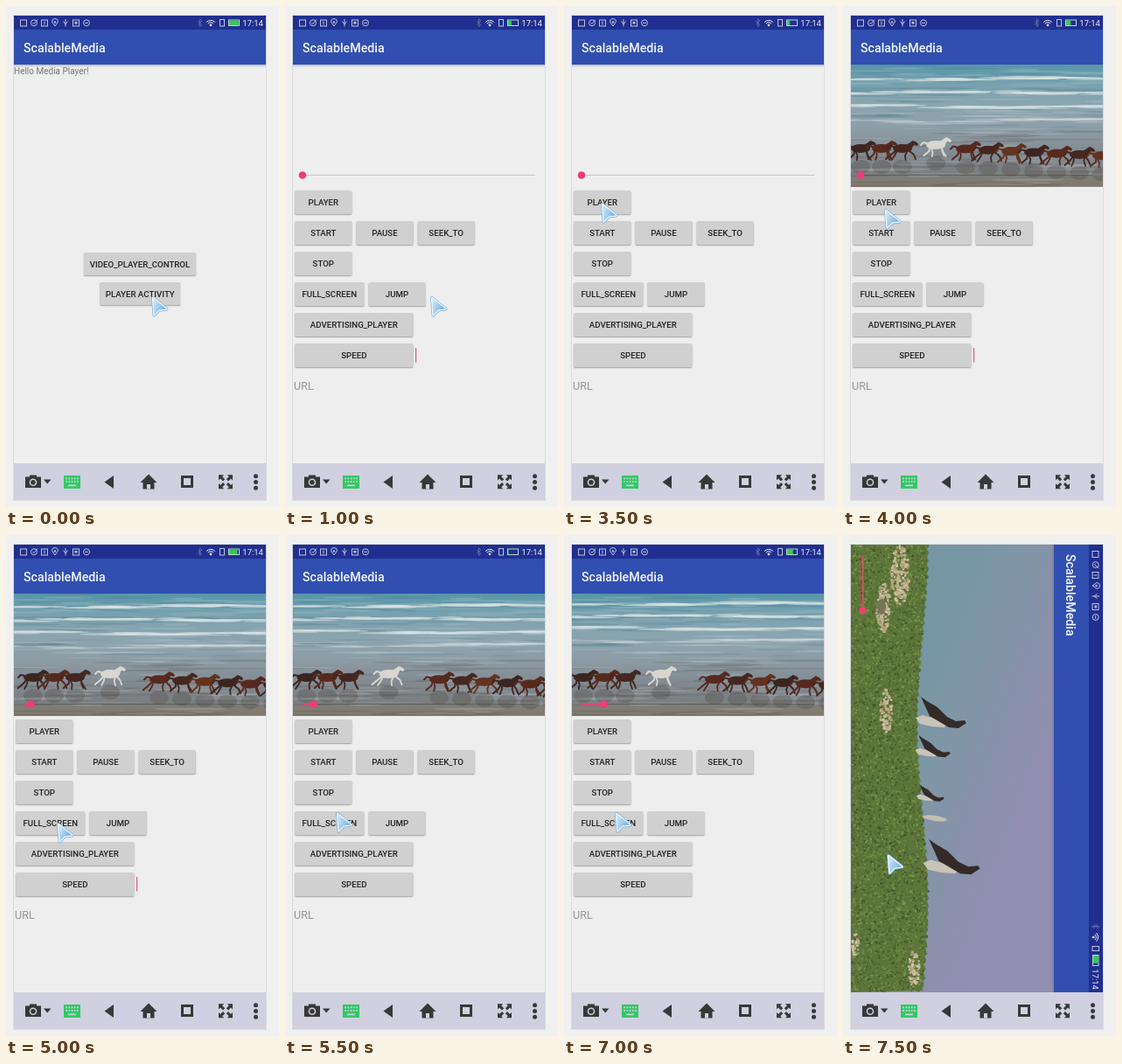
These frames come from a looping animation (312x573 px, 8 s). An HTML page with a canvas:

```html
<!DOCTYPE html>
<html lang="en">
<head>
<meta charset="utf-8">
<title>Media player demo</title>
<style>
html, body { margin: 0; width: 312px; height: 573px; overflow: hidden; background: #f0f0f0; }
canvas { display: block; width: 312px; height: 573px; }
</style>
</head>
<body>
<canvas id="stage"></canvas>
<script>
const W = 312, H = 573, STEP = 500, STEPS = 16;
const VIDEO = 8, ROTATED = 15;
const canvas = document.getElementById('stage');
const c = canvas.getContext('2d');
const ratio = window.devicePixelRatio || 1;
canvas.width = W * ratio;
canvas.height = H * ratio;

const TAU = Math.PI * 2;
const mix = (a, b, p) => a + (b - a) * p;

function seeded(seed) {
  return () => (seed = (seed * 16807) % 2147483647) / 2147483647;
}
function along(values, k) {
  const i = Math.min(Math.floor(k), values.length - 2);
  return mix(values[i], values[i + 1], k - i);
}
function rect(x, y, w, h, color) {
  c.fillStyle = color;
  c.fillRect(x, y, w, h);
}
function oval(x, y, rx, ry, color, turn = 0) {
  c.fillStyle = color;
  c.beginPath();
  c.ellipse(x, y, rx, ry, turn, 0, TAU);
  c.fill();
}
const dot = (x, y, r, color) => oval(x, y, r, r, color);
function trace(pts) {
  c.beginPath();
  for (let i = 0; i < pts.length; i += 2) c.lineTo(pts[i], pts[i + 1]);
}
function poly(pts, color) {
  trace(pts);
  c.fillStyle = color;
  c.fill();
}
function line(pts, color, width = 1) {
  trace(pts);
  c.strokeStyle = color;
  c.lineWidth = width;
  c.stroke();
}
function box(x, y, w, h, color, width = 1) {
  c.strokeStyle = color;
  c.lineWidth = width;
  c.strokeRect(x, y, w, h);
}
function ring(x, y, r, color, from = 0, to = TAU) {
  c.strokeStyle = color;
  c.lineWidth = 1;
  c.beginPath();
  c.arc(x, y, r, from, to);
  c.stroke();
}
function text(str, x, y, size, color, weight = 400, align = 'left') {
  c.font = `${weight} ${size}px Roboto, sans-serif`;
  c.textAlign = align;
  c.fillStyle = color;
  c.fillText(str, x, y);
}
function fade(x0, y0, x1, y1, colors) {
  const g = c.createLinearGradient(x0, y0, x1, y1);
  colors.forEach((col, i) => g.addColorStop(i / (colors.length - 1), col));
  return g;
}

// Status bar and app bar; origin is the top left corner of the screen.
function bars(w, n) {
  const ink = '#bcc2e2', bright = '#eceef8';
  rect(0, 0, w, 16, '#202f8f');
  rect(0, 16, w, 40, '#304fb0');
  for (const i of [0, 2, 5]) box(7.5 + i * 12, 5, 7, 7, ink);
  for (const i of [1, 6]) ring(11 + i * 12, 8.3, 3.5, ink);
  line([21.5, 8, 23, 9.5, 27, 4.5], ink);
  line([35, 6.5, 35, 10.5], ink);
  c.beginPath();
  c.arc(47, 7, 3.5, Math.PI, 0);
  c.lineTo(47, 12);
  c.closePath();
  c.stroke();
  dot(47, 7.5, 1.2, ink);
  line([59, 4, 59, 12.5], ink);
  line([56.5, 6.5, 59, 10, 61.5, 6.5], ink);
  rect(69.5, 7, 3, 2.5, ink);
  line([81, 8.3, 85, 8.3], ink);

  c.save();
  c.translate(w - 288, 0);
  line([210, 6, 215, 10.5, 212.5, 12.5, 212.5, 4, 215, 6, 210, 10.5], '#6a75b4', .8);
  for (let r = 2; r < 8; r += 2.3) ring(225, 12, r, bright, -2.4, -.74);
  dot(225, 11.3, 1.1, bright);
  box(235.5, 4.5, 5, 7.5, ink);
  box(245.5, 5, 12, 6.5, '#b9dcc8');
  rect(246, 5.5, 11 * ((n / 5.3 + .97) % 1), 5.5, '#38c858');
  text('17:14', 261.3, 12, 9.5, bright);
  c.restore();
  text('ScalableMedia', 11, 42, 14.2, '#f4f5fb', 500);
}

function button(label, x, y, w, h, pressed) {
  c.save();
  c.shadowColor = 'rgba(0,0,0,.32)';
  c.shadowBlur = (pressed ? 4 : 1.5) * ratio;
  c.shadowOffsetY = ratio;
  c.fillStyle = pressed ? '#bcbcbc' : '#d0d0d0';
  c.beginPath();
  c.roundRect(x, y, w, h, 1.5);
  c.fill();
  c.restore();
  text(label, x + w / 2, y + h / 2 + 3.5, 9.7, '#222', 500, 'center');
}

function toolbar() {
  const ink = '#383838', green = '#34c864', bg = '#d0d0e0';
  rect(9, 523, 288, 42, bg);
  rect(22, 538.5, 18, 12.5, ink);
  rect(27, 536.5, 8, 3, ink);
  dot(31, 544.7, 4.3, bg);
  dot(31, 544.7, 2.8, ink);
  poly([43, 541.5, 51.5, 541.5, 47.2, 546.5], ink);

  rect(66, 537, 19, 15, green);
  for (let i = 0; i < 10; i++)
    rect(68.3 + i % 5 * 3.2, i < 5 ? 539.5 : 543.1, 1.7, 1.8, bg);
  rect(71, 547.5, 9, 1.7, bg);

  poly([123, 537, 123, 552, 112.5, 544.5], ink);
  poly([163, 535.5, 172.5, 545, 153.5, 545], ink);
  rect(156.5, 544, 13, 8.5, ink);
  rect(161, 547, 4, 5.5, bg);
  box(201.5, 538.5, 11, 11, ink, 3);
  for (let i = 0; i < 4; i++) {
    c.save();
    c.translate(251, 544.3);
    c.rotate(i * TAU / 4);
    poly([8, 8, 8, 1.8, 6, 3.8, 3, .8, .8, 3, 3.8, 6, 1.8, 8], ink);
    c.restore();
  }
  for (let i = 0; i < 3; i++) dot(285.5, 537.7 + i * 6.8, 2.5, ink);
}

// Each stop: first step, x, y.
const stops = [[0, 167, 333], [3, 43, 226], [8, 48, 233], [9, 54, 284],
  [10, 59, 330], [11, 59, 318], [15, 51, 366]];

function cursor(n) {
  const [, x, y] = stops.filter(s => s[0] <= n).pop();
  c.save();
  c.translate(x + 1, y + 1);
  c.lineJoin = 'round';
  const arrow = [0, 0, 15.5, 12.5, 7, 13.5, 1.5, 19.5, 0, 0, 15.5, 12.5];
  line(arrow, '#7ba9d8', 3.8);
  line(arrow, '#f2f8ff', 2.4);
  poly(arrow, fade(0, 8, 13, 13, ['#c4e4f6', '#78b2e4']));
  c.restore();
}

function horse(x, y, color, phase) {
  c.save();
  c.translate(x, y);
  oval(0, 21, 11, 8, 'rgba(62,48,42,.22)');
  c.lineCap = c.lineJoin = 'round';
  const a = Math.sin(phase) * 3;
  for (const side of [-1, 1]) {
    line([side * 7, 2, side * (10 + a), 7, side * (14 + a) - 2, 12], color, 2);
    line([side * 6, 2, side * 6 - a, 8, side * 8 - a * 1.5, 13], color, 1.8);
  }
  oval(0, 0, 11, 5, color);
  poly([4, -4, 12, -9, 14, -6, 9, 3], color);
  oval(14, -6, 4.2, 1.9, color, .5);
  line([-10, -2, -14, -3, -17, 0], color, 2);
  c.restore();
}

function beach(n) {
  const k = (n - VIDEO) / 2, rnd = seeded(17);
  c.save();
  c.beginPath();
  c.rect(9, 67, 288, 140);
  c.clip();
  rect(9, 67, 288, 140, fade(0, 67, 0, 207,
    ['#5796a8', '#74a0ae', '#86a5b0', '#8ea3ac', '#8b99a2', '#828b92', '#7b8084', '#81796b']));

  for (let i = 0; i < 150; i++) {
    const y = 67 + rnd() * 140;
    const tint = i % 2 ? '200,215,218' : y < 140 ? '55,105,125' : '75,65,56';
    oval(rnd() * 306, y, 15 + rnd() * 35, .5 + rnd(), `rgba(${tint},.2)`);
  }
  for (let i = 0; i < 4; i++) {
    const y = 83 - k * 1.5 + i * (16 - k * .6);
    for (let j = 0; j < 26; j++) {
      const x = rnd() * 306;
      oval(x, y + Math.sin(x * .02 + i * 2) + (rnd() - .5) * 2.5, 14 + rnd() * 26, .6 + rnd() * .8,
        `rgba(222,230,230,${i < 3 ? .5 : .25})`);
    }
  }

  const left = along([20, 31, 18, 22], k);
  const white = along([106, 119, 118, 111], k);
  const right = along([140, 175, 177, 172], k);
  const coats = ['#3c2521', '#57291f', '#45271f', '#63331f'];
  const run = (x, i) => horse(x, 163 + Math.max(0, x - 130) * .05, coats[i % 4], n * 1.3 + i * 1.9);
  for (let i = 0; i < 3; i++) run(left + i * 24, i);
  horse(white, 159, '#d9d6d0', n * 1.3);
  for (let i = 0; i < 7; i++) run(right + i * 26, i + 1);
  c.restore();
}

function slider(n) {
  const x = 20 + Math.max(0, n - VIDEO) * 4.2;
  rect(20, 193, 266, 1, n < VIDEO ? '#c6c6c6' : 'rgba(60,55,52,.45)');
  rect(20, 192.7, x - 20, 1.6, '#f04078');
  dot(x, 193.5, 4.3, '#f23a78');
}

function home(n) {
  text('Hello Media Player!', 9, 78, 10, '#757575');
  button('VIDEO_PLAYER_CONTROL', 89, 282, 128, 26);
  button('PLAYER ACTIVITY', 107.5, 316, 91.5, 26, n === 1);
}

const rows = [['PLAYER'], ['START', 'PAUSE', 'SEEK_TO'], ['STOP'],
  ['FULL_SCREEN', 'JUMP'], ['ADVERTISING_PLAYER'], ['SPEED']];

function player(n) {
  if (n >= VIDEO) beach(n);
  slider(n);
  rows.forEach((labels, row) => {
    let x = 11.3;
    for (const label of labels) {
      const w = row > 3 ? 135 : label === 'FULL_SCREEN' ? 79 : 65;
      button(label, x, 211 + row * 35, w, 27);
      x += w + 5.2;
    }
  });
  if (n % 2 === 0 && n < 14) rect(149, 391, 1.2, 16.5, '#e8508a');
  text('URL', 10, 439, 12.6, '#959595');
}

function bird(x, y, s) {
  c.save();
  c.translate(x, y);
  c.scale(s, s);
  poly([-4, 24, 4, 21, 18, 25, 31, 32, 29, 35, 14, 34, 1, 31], '#c9c3b8');
  poly([2, 0, 9, 5, 21, 12, 32, 23, 42, 28, 52, 27, 54, 30, 45, 36, 34, 35, 12, 22], '#342b29');
  c.restore();
}

function meadow() {
  const edge = y => 91 + 6 * Math.cos((y - 420) / 65) + Math.sin(y * .7) * 1.2;
  rect(9, 11, 232, 512, fade(82, 180, 241, 240, ['#7796a3', '#8096a6', '#8991ab', '#918eb1']));
  const shape = [9, 11];
  for (let y = 11; y <= 523; y += 3) shape.push(edge(y), y);
  shape.push(9, 523);
  poly(shape, '#5d7539');

  const rnd = seeded(91);
  const speck = (x, y, size, hue, sat, light) =>
    rect(x, y, size, size, `hsl(${hue},${sat}%,${light + rnd() * 22}%)`);
  for (let i = 0; i < 6500; i++) {
    const y = 11 + rnd() * 510;
    speck(9 + rnd() * (edge(y) - 10), y, 1 + rnd() * 1.5, 87, 33, 24);
  }
  for (const [x, y, r] of [[64, 45, 10], [45, 82, 8], [48, 200, 7], [80, 495, 6], [13, 468, 4]])
    for (let i = 0; i < r * r * 2; i++) {
      const a = rnd() * TAU, q = Math.sqrt(rnd()) * r;
      speck(x + Math.cos(a) * q, y + Math.sin(a) * q * 3.5, 2 + rnd(), 40, 28, 55);
    }
  oval(44, 82, 5, 9, '#77745a');

  bird(87, 185, 1);
  bird(85, 229, .7);
  bird(86, 285, .55);
  bird(96, 348, 1.12);
  oval(105, 324, 14, 3, '#c4bfb5', .15);

  rect(22, 24, 1.6, 62, '#e8486a');
  dot(22.5, 86, 4.2, '#ee4068');
  rect(239, 11, 2, 512, '#8582a0');
}

function draw(n) {
  const rotated = n === ROTATED;
  c.setTransform(ratio, 0, 0, ratio, 0, 0);
  rect(0, 0, W, H, '#f0f0f0');
  box(8.5, 10.5, 289, 555, '#dcdcdc');
  rect(9, 11, 288, 512, '#eeeeee');
  rect(9, 67, 288, 3, fade(0, 67, 0, 70, ['#b4b8c8', '#eeeeee']));
  if (rotated) meadow();
  else if (n < 2) home(n);
  else player(n);

  c.save();
  c.translate(rotated ? 297 : 9, 11);
  if (rotated) c.rotate(TAU / 4);
  bars(rotated ? 512 : 288, n);
  c.restore();
  toolbar();
  cursor(n);
}

const start = performance.now();
let shown = -1;
function tick() {
  const n = Math.floor((performance.now() - start) / STEP) % STEPS;
  if (n !== shown) draw(shown = n);
  requestAnimationFrame(tick);
}
tick();
</script>
</body>
</html>
```
